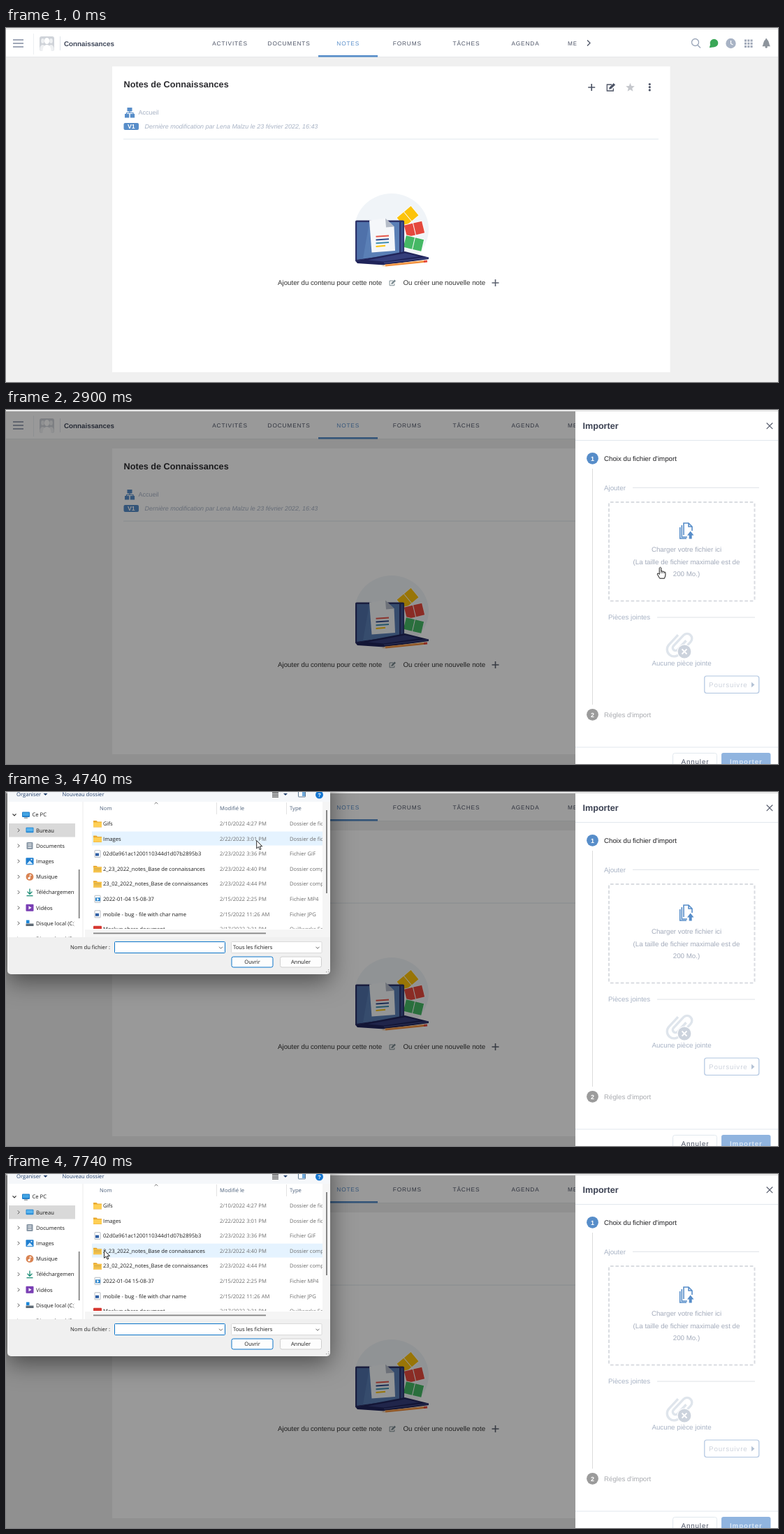
Write an HTML page with a canvas that moves like this. It is 1105 px wide and 507 px high and loops after 8 s.

```html
<!DOCTYPE html>
<html lang="fr">
<head>
<meta charset="utf-8">
<title>Importer des notes</title>
<style>
html, body { margin: 0; width: 100%; height: 100%; overflow: hidden; background: #f0f0f0; }
canvas { display: block; }
</style>
</head>
<body>
<canvas id="stage" width="1105" height="507"></canvas>
<script>
const W = 1105, H = 507, LOOP = 8000;
const c = document.getElementById('stage').getContext('2d');
const SANS = "'Liberation Sans', Arial, sans-serif";
const UI = "'Open Sans', 'Noto Sans', sans-serif";
const BLUE = '#578dc9', MUTE = '#a8b3c5', DARK = '#4d5466', LINE = '#e1e8ee', INK = '#2b2b2f';
const WIN = '#0a74c9', TRACK_BG = '#f5f5f5', THUMB = '#868686';

// ---- helpers ----
const clamp = v => Math.max(0, Math.min(1, v));
const ramp = (t, a, b) => clamp((t - a) / (b - a));

function rect(x, y, w, h, col) { c.fillStyle = col; c.fillRect(x, y, w, h); }

function box(x, y, w, h, r, fill, edge, lw = 1) {
  c.beginPath();
  c.roundRect(x, y, w, h, r);
  if (fill) { c.fillStyle = fill; c.fill(); }
  if (edge) { c.strokeStyle = edge; c.lineWidth = lw; c.stroke(); }
}

function dot(x, y, r, col, ry = r) {
  c.beginPath();
  c.ellipse(x, y, r, ry, 0, 0, 7);
  c.fillStyle = col;
  c.fill();
}

function path(d, fill, edge, lw = 1) {
  const p = new Path2D(d);
  if (fill) { c.fillStyle = fill; c.fill(p); }
  if (edge) { c.strokeStyle = edge; c.lineWidth = lw; c.stroke(p); }
}

function shadowed(blur, dy, col, fn) {
  c.save();
  c.shadowColor = col;
  c.shadowBlur = blur;
  c.shadowOffsetY = dy;
  fn();
  c.restore();
}

function clip(x, y, w, h, fn) {
  c.save();
  c.beginPath();
  c.rect(x, y, w, h);
  c.clip();
  fn();
  c.restore();
}

function at(x, y, angle, fn) {
  c.save();
  c.translate(x, y);
  c.rotate(angle);
  fn();
  c.restore();
}

// y is the middle of the capital letters
function text(s, x, y, size, col, { style = '', align = 'left', gap = 0, font = SANS } = {}) {
  c.font = `${style} ${size}px ${font}`;
  c.letterSpacing = gap + 'px';
  c.textAlign = align;
  c.fillStyle = col;
  c.fillText(s, x, y + size * 0.358);
}
const ui = (s, x, y, col = '#1b1b1b', align = 'left') => text(s, x, y, 7.65, col, { align, font: UI });

function chevron(x, y, s, dir, col, lw = 1) {
  at(x, y, dir * Math.PI / 2, () => path(`M${-s / 2} ${-s}L${s / 2} 0L${-s / 2} ${s}`, null, col, lw));
}

function plus(x, y, s, col, lw) {
  path(`M${x - s} ${y}h${2 * s}M${x} ${y - s}v${2 * s}`, null, col, lw);
}

function editIcon(x, y, k, col) {
  c.save();
  c.translate(x, y);
  c.scale(k, k);
  path('M1.5 -4H-5.2V5H3.8V1.5', null, col, 1.3);
  path('M-2.4 2.8L-1.8 0L4.2 -6L6.6 -3.6L.5 2.3Z', col);
  c.restore();
}

// ---- page ----
function header() {
  rect(0, 0, W, 41, '#fff');
  rect(0, 41, W, 1, '#e6e8ea');
  for (const y of [16, 21, 26]) rect(10, y, 15, 2, '#a0a8b8');
  rect(39, 8, 1, 30, '#eceff2');
  rect(77, 12, 1, 20, '#dfe4ea');
  c.save();
  box(48, 12, 21, 21, 3, '#cfd3d9');
  c.clip();
  for (const x of [52.5, 64.5]) {
    dot(x, 18.5, 2.3, '#eff1f3', 3.4);
    dot(x, 30, 4.2, '#eff1f3', 6);
  }
  dot(58.5, 18.5, 3.6, '#fff', 4.6);
  dot(58.5, 32, 6, '#fff', 8);
  c.restore();
  text('Connaissances', 83, 22, 9.8, '#3f4759', { style: 'bold' });

  ['ACTIVITÉS', 'DOCUMENTS', 'NOTES', 'FORUMS', 'TÂCHES', 'AGENDA'].forEach((s, i) =>
    text(s, 320.5 + i * 84.6, 22, 8.3, i === 2 ? BLUE : DARK, { align: 'center', gap: 0.85 }));
  clip(800, 10, 16.5, 24, () => text('MEMBRES', 804, 22, 8.3, DARK, { gap: 0.85 }));
  rect(447, 39, 85, 2.6, BLUE);
  chevron(834, 21.5, 4, 0, DARK, 1.3);

  c.beginPath();
  c.arc(986.5, 20.5, 5, 0, 7);
  c.strokeStyle = '#9aa5b8';
  c.lineWidth = 1.3;
  c.stroke();
  path('M990 24.5L994 28.5', null, '#9aa5b8', 1.5);
  dot(1013.5, 21.5, 5.8, '#3aa757');
  path('M1006.8 28.3L1008.6 22L1014 27.2Z', '#3aa757');
  dot(1037.5, 22, 7.2, MUTE);
  path('M1037.5 18V22.5L1040.5 24', null, '#fff', 1.2);
  for (let i = 0; i < 9; i++) rect(1057 + i % 3 * 4.3, 16.5 + Math.floor(i / 3) * 4.3, 3, 3, '#a0a8b8');
  path('M1082.5 26.2C1084.6 24 1083.6 17 1088.2 16.6C1092.8 17 1091.8 24 1094 26.2Z', '#8d949c');
  dot(1088.2, 16.3, 1.2, '#8d949c');
  dot(1088.2, 27.2, 1.6, '#8d949c');
}

function swatch(x, y, angle, col) {
  at(x, y, angle, () => {
    rect(-14, -9.5, 28, 19, '#fbfcfd');
    rect(-13, -8.5, 12.5, 17, col);
    rect(0.5, -8.5, 12.5, 17, col);
  });
}

function artwork() {
  clip(490, 230, 125, 99, () => dot(552, 288, 53, '#f0f4f8', 51));
  swatch(575, 270, -0.7, '#fcc30b');
  swatch(584.5, 288, -0.24, '#e5493d');
  swatch(583.5, 308.5, 0.23, '#45b865');
  path('M500 277Q500 275.5 502 275.5H568Q570 275.5 570 277V321L500 334Z', '#2c3269');
  path('M502.5 278H563V324L502.5 331.5Z', '#5a7fb6');
  path('M502.5 278H520L511 330.5L502.5 331.5Z', '#4f71aa');
  path('M565 278H568.5V322L565 323Z', '#3d528f');
  path('M500 333.5L571 320L605 328.5V331L541 339.5L503 337Z', '#20245a');
  path('M518 332.5L571 322.5L591 327L541 334.5Z', '#353e7b');
  path('M541 336.5L605 328.8', null, '#5560a0', 0.8);
  path('M520 275.5L543 272.5L555.5 284.5L557 319L523.5 321.5Z', '#f5f7fa');
  path('M543 272.5L555.5 284.5L544 285.5Z', '#b4bbc7');
  ['#e5574a', '#2f4a8c', '#3f8fb0', '#fcc30b'].forEach((col, i) => {
    const y = 298.8 + i * 4.7;
    path(`M529.5 ${y}L${i === 3 ? 543 : 548} ${y - 1.2}`, null, col, 2);
  });
  path('M543 340L600 334.2', null, '#f08a35', 3);
  path('M543 339.3L600 333.5', null, '#f9b36b', 1);
  path('M537.5 341.2L543 338.4V341.6Z', '#f3d3b0');
  path('M598 334.4L603 333.9', null, '#e5493d', 3);
}

function page(kebab) {
  rect(0, 0, W, H, '#f0f0f0');
  header();
  rect(152, 55, 798.5, 438, '#fff');
  text('Notes de Connaissances', 168.5, 80, 12.7, INK, { style: 'bold' });

  plus(838.2, 85, 5, DARK, 1.7);
  editIcon(865.5, 85, 1, DARK);
  c.beginPath();
  for (let i = 0; i < 10; i++) {
    const r = i % 2 ? 2.9 : 6.6, a = i * Math.PI / 5;
    c.lineTo(893.5 + r * Math.sin(a), 85.3 - r * Math.cos(a));
  }
  c.fillStyle = '#c5c7cc';
  c.fill();
  if (kebab > 0) dot(921.3, 84.5, 12.6, `rgba(60,60,60,${0.22 * kebab})`);
  for (const y of [80.5, 84.7, 88.9]) dot(921.3, y, 1.6, DARK);

  rect(173.5, 114, 7, 5.5, BLUE);
  path('M177 119V121.5M172.5 124V121.5H182V124', null, BLUE, 1.2);
  rect(170, 123, 6.3, 5.5, BLUE);
  rect(177.8, 123, 6.3, 5.5, BLUE);
  text('Accueil', 189.5, 120.5, 9, MUTE);
  box(168.5, 136, 21.5, 10, 2, BLUE);
  text('V1', 179.3, 141, 8.8, '#fff', { style: 'bold', align: 'center' });
  text('Dernière modification par Lena Malzu le 23 février 2022, 16:43', 198.5, 140.5, 8.96, MUTE, { style: 'italic' });
  rect(168, 158.6, 766, 1, LINE);

  artwork();
  text('Ajouter du contenu pour cette note', 389, 364.5, 9.72, '#333');
  editIcon(553, 365, 0.75, '#7a8a90');
  text('Ou créer une nouvelle note', 568.5, 364.5, 9.76, '#333');
  plus(700.5, 365, 5, '#5c6270', 1.6);
}

// ---- drop-down menu ----
const MENU = [
  ['Copier le Lien', 'M838 108.5L843 102.5M836.5 107L839 104.5M841.5 106.8L844 104.2M837 109.5L840 109'],
  ['Historique', 'M837 124A4.2 4.2 0 1 1 837.5 129M836 121.5V124.5H839M840.5 123.5V126.5L842.5 127.5'],
  ['Imprimer en PDF', ''],
  ['Exporter', 'M842 165.5V164H836V172H842V170.5M839 168H845.5M843.5 166L845.5 168L843.5 170'],
  ['Importer', 'M838 186.5V185H845V193H838V191.5M835.5 189H842M840 187L842 189L840 191']
];

function menu(alpha) {
  if (alpha <= 0) return;
  c.save();
  c.globalAlpha = alpha;
  shadowed(9, 3, 'rgba(0,0,0,.35)', () => box(828.5, 90, 104.5, 115, 2, '#fff'));
  MENU.forEach(([label, icon], i) => {
    const y = 105.5 + i * 20.8;
    if (icon) path(icon, null, '#8fadd3', 1.2);
    else box(836, y - 4.7, 9, 9.4, 1, '#7fa3d0');
    text(label, 852, y, 9.75, '#8e9096');
  });
  c.restore();
}

// ---- side drawer ----
function step(n, y, col, label, ink) {
  dot(839.5, y, 8.4, col);
  text(n, 839.5, y, 9, '#fff', { style: 'bold', align: 'center' });
  text(label, 856, y, 9.73, ink);
}

function drawer(dx) {
  if (dx >= 290) return;
  c.save();
  c.translate(dx, 0);
  rect(815, 2, 290, 505, '#fff');
  text('Importer', 825.5, 22.5, 12.6, '#3b4152', { style: 'bold' });
  path('M1088.7 18.5L1097.3 27.1M1097.3 18.5L1088.7 27.1', null, '#5a6070', 1.2);
  rect(815, 43, 290, 1, LINE);
  rect(839, 84, 1, 338, '#dcdcdc');
  step('1', 69.3, BLUE, "Choix du fichier d'import", '#1f1f22');
  step('2', 436.3, '#9b9b9b', "Régles d'import", '#a9abb0');

  text('Ajouter', 856, 111.5, 9.75, MUTE);
  rect(897, 110.7, 181, 1, '#dde1e6');
  c.setLineDash([4.6, 2.8]);
  box(863, 132, 208.5, 141.5, 2, null, '#d9dce1', 2);
  c.setLineDash([]);
  path('M970 179V162H977L982 167V173M977 162V167H982M967.3 165V182H975M964.7 168V184H974', null, BLUE, 1.6);
  path('M979.7 173.5L984.5 179.5H981.7V184.5H977.7V179.5H975Z', BLUE);
  ['Charger votre fichier ici', '(La taille de fichier maximale est de', '200 Mo.)'].forEach((s, i) =>
    text(s, 974, 200 + i * 17.2, 9.75, '#a3abbb', { align: 'center' }));

  text('Pièces jointes', 862, 297, 9.75, MUTE);
  rect(932, 296.5, 140, 1, '#dde1e6');
  at(964.5, 335.5, -0.82, () =>
    path('M10 3H-8A4 4 0 0 1 -8 -5H13A7 7 0 0 1 13 9H-11A10 10 0 0 1 -11 -11H8', null, '#dfe5ec', 3.4));
  dot(971, 346, 10.5, '#fff');
  dot(971, 346, 9.4, '#ccd3dd');
  path('M967.5 342.5L974.5 349.5M974.5 342.5L967.5 349.5', null, '#fff', 1.8);
  text('Aucune pièce jointe', 967, 362.3, 9.75, MUTE, { align: 'center' });
  box(999.8, 381, 78, 24.5, 3, '#fff', '#b0c5e0', 1.2);
  text('Poursuivre', 1006, 393.5, 9.75, '#ccd2dc', { gap: 0.9 });
  path('M1067 389.8L1071.5 393.5L1067 397.2Z', '#b4c2d5');

  rect(815, 482.5, 290, 1, LINE);
  box(954.5, 491.5, 63, 30, 3, '#fff', LINE);
  text('Annuler', 966.5, 503.7, 9.75, DARK, { gap: 0.9 });
  box(1024, 491, 70.5, 30, 3, '#90b4df');
  text('Importer', 1036, 503.7, 9.75, '#d9e6f5', { style: 'bold', gap: 0.9 });
  c.restore();
}

// ---- file dialog ----
const PLACES = ['Ce PC', 'Bureau', 'Documents', 'Images', 'Musique', 'Téléchargements', 'Vidéos', 'Disque local (C:)', 'Disque local (D:)'];
const FILES = [
  ['dir', 'Gifs', '2/10/2022 4:27 PM', 'Dossier de fichiers'],
  ['dir', 'Images', '2/22/2022 3:01 PM', 'Dossier de fichiers'],
  ['pic', '02d0a961ac1200110344d1d07b2895b3', '2/23/2022 3:36 PM', 'Fichier GIF'],
  ['zip', '2_23_2022_notes_Base de connaissances', '2/23/2022 4:40 PM', 'Dossier compressé'],
  ['zip', '23_02_2022_notes_Base de connaissances', '2/23/2022 4:44 PM', 'Dossier compressé'],
  ['mov', '2022-01-04 15-08-37', '2/15/2022 2:25 PM', 'Fichier MP4'],
  ['pic', 'mobile - bug - file with char name', '2/15/2022 11:26 AM', 'Fichier JPG'],
  ['red', 'Mockup share document', '2/17/2022 2:21 PM', 'Quillworks Edition']
];
const ROW = 21.55, SIDE = 22.2;

function fileIcon(kind, x, y) {
  if (kind === 'red') return box(x, y - 4.5, 12, 9, 1, '#d63a33');
  if (kind === 'dir' || kind === 'zip') {
    path(`M${x} ${y - 4.5}h4.5l1.5 1.5h6v8h-12Z`, '#e9a92f');
    rect(x, y - 2, 12, 6.5, '#ffcf55');
    if (kind === 'zip') {
      rect(x + 1, y - 0.5, 10, 1, '#b98f3a');
      rect(x + 1, y + 2, 10, 1, '#d9a93f');
    }
    return;
  }
  box(x + 2, y - 5, 8, 10, 0.5, '#fff', '#a5abb3', 0.8);
  const movie = kind === 'mov';
  rect(x + 3, y - (movie ? 2 : 1), movie ? 7 : 5, movie ? 5 : 4, movie ? '#2d86cc' : '#2f5fa5');
  if (movie) path(`M${x + 5} ${y - 1.5}l3.4 2l-3.4 2Z`, '#fff');
}

function placeIcon(i, x, y) {
  if (i < 2) {
    box(x, y - 4, 11, 7.5, 1, i ? '#2a8ad4' : '#1f7cc7');
    rect(x + 1, y - 3, 9, 4.5, i ? '#58b4ee' : '#43a5e4');
    if (!i) rect(x + 3, y + 4, 5, 1, '#5b6770');
  } else if (i === 2) {
    box(x + 1, y - 5, 9, 10, 1, '#8796a5');
    for (const d of [-2.5, 0, 2.5]) rect(x + 3, y + d - 0.5, 5, 1, '#fff');
  } else if (i === 3) {
    box(x, y - 5, 11, 10, 1, '#1f7fd0');
    path(`M${x + 1} ${y + 4}l4.5 -5l4.5 5Z`, '#d9efff');
    dot(x + 8, y - 2.5, 1, '#fff');
  } else if (i === 4) {
    dot(x + 5.5, y, 5.4, '#d98352');
    dot(x + 4.5, y + 2, 1.6, '#fff');
    path(`M${x + 5.8} ${y + 2}v-5l2.4 1`, null, '#fff', 1);
  } else if (i === 5) {
    path(`M${x + 5.5} ${y - 5}v7.5M${x + 2} ${y - 1}l3.5 3.6l3.5 -3.6M${x + 1} ${y + 5}h9`, null, '#178a72', 1.3);
  } else if (i === 6) {
    box(x, y - 5, 11, 10, 1, '#7a3fb4');
    path(`M${x + 4} ${y - 2.5}l4 2.5l-4 2.5Z`, '#fff');
  } else {
    rect(x, y + 0.5, 11, 3.5, '#5f6b75');
    if (i === 7) rect(x + 0.5, y - 4.5, 4.5, 4.5, '#1b86d8');
  }
}

function sidebar(hover) {
  clip(2, 14, 107, 194, () => {
    rect(4, 45, 95, 19.5, '#d9d9d9');
    if (hover >= 0 && hover !== 1) rect(4, 22 + hover * SIDE, 95, 20.5, '#e5f3ff');
    PLACES.forEach((name, i) => {
      const y = 32.6 + i * SIDE, x = i ? 28.5 : 23;
      if (i) chevron(18, y, 2.5, 0, '#555');
      else chevron(12, y, 2.5, 1, '#333', 1.2);
      placeIcon(i, x, y);
      clip(0, 0, 98, 220, () => ui(name, i ? 43 : 37.5, y));
    });
    rect(103.8, 111, 1.8, 70, THUMB);
  });
  if (hover === 7) {
    shadowed(3, 1.5, 'rgba(0,0,0,.5)', () => box(40, 180.5, 65.5, 16.5, 1, '#f9f9f9'));
    ui(PLACES[7], 43, 188);
  }
}

function fileList(hover) {
  ui('Nom', 134, 23.5, '#4c607a');
  ui('Modifié le', 306, 23.5, '#4c607a');
  ui('Type', 406, 23.5, '#4c607a');
  for (const x of [301, 401]) rect(x, 15, 1, 17, '#e3e3e3');
  chevron(215, 16, 2.4, 3, '#777');
  clip(110, 33, 343, 163, () => {
    if (hover >= 0) rect(123, 35 + hover * ROW, 330, 20, '#e5f3ff');
    FILES.forEach(([kind, name, date, type], i) => {
      const y = 45.5 + i * ROW;
      fileIcon(kind, 125, y);
      ui(name, 139, y);
      ui(date, 306, y, '#6d6d6d');
      ui(type, 406, y, '#6d6d6d');
    });
  });
  rect(453, 14, 11, 194, TRACK_BG);
  rect(113, 197, 340, 11, TRACK_BG);
  rect(458, 26, 2, 119, THUMB);
  rect(125, 201.5, 247, 1.8, THUMB);
}

function dialog(t, cur) {
  const p = ramp(t, 3850, 4000);
  if (p <= 0) return;
  const inside = t > 4200;
  const side = inside && cur.x > 4 && cur.x < 99 && cur.y < 208 ? Math.floor((cur.y - 21.5) / SIDE) : -1;
  const row = inside && cur.x > 123 && cur.x < 453 && cur.y > 35 && cur.y < 196 ? Math.floor((cur.y - 35) / ROW) : -1;

  c.save();
  c.globalAlpha = p;
  shadowed(34, 10, 'rgba(0,0,0,.5)', () => box(2, -30, 462, 291, 5, '#f0f0f0'));
  rect(2, 0, 462, 14, '#f5f7fa');
  rect(2, 14, 462, 194, '#fff');
  ui('Organiser', 15, 3.5, '#26436e');
  path('M53.5 2L59.5 2L56.5 5Z', '#26436e');
  ui('Nouveau dossier', 80.5, 3.5, '#26436e');
  for (let i = 0; i < 4; i++) rect(381, i * 2.2, 9, 1.1, '#444');
  path('M397 2L403 2L400 5Z', '#26436e');
  box(418.5, -1, 10, 8, 0.5, '#fff', '#5c7690');
  rect(424, 0, 4, 6, '#6fa9da');
  dot(448.5, 4, 5.5, '#1677d2');
  text('?', 448.5, 4, 7.5, '#fff', { style: 'bold', align: 'center' });
  rect(109.5, 14, 1, 194, '#ececec');

  fileList(row);
  sidebar(side);

  ui('Nom du fichier :', 92, 222.6);
  box(155.5, 214.5, 158, 16, 1, '#fff', WIN);
  chevron(307.5, 223, 2.5, 1, '#666');
  if (t < 4000 || Math.floor((t - 4000) / 530) % 2 === 0) rect(158, 217.5, 1, 10.5, '#111');
  box(322.5, 214.5, 129.5, 16, 1, '#fff', '#dadada');
  ui('Tous les fichiers', 325, 222.6);
  chevron(446, 223, 2.5, 1, '#666');
  box(323, 236, 59, 15, 2.5, '#fdfdfd', WIN);
  ui('Ouvrir', 352.5, 243.5, '#1b1b1b', 'center');
  box(392.5, 236, 59, 15, 2.5, '#fdfdfd', '#cfcfcf');
  ui('Annuler', 422, 243.5, '#1b1b1b', 'center');
  for (const [x, y] of [[461, 254], [461, 257], [458, 257]]) rect(x, y, 1.3, 1.3, '#a5a5a5');
  c.restore();
}

// ---- pointer: time, x, y, hand ----
const TRACK = [
  [150, 1040, 474, 0], [910, 913, 103, 0], [1000, 920, 86, 1], [1260, 921, 87, 1],
  [1440, 926.5, 108, 1], [1570, 945, 150, 1], [1720, 886, 186, 1], [2200, 882, 185, 0],
  [2620, 882, 185, 1], [2900, 936.5, 225, 1], [3230, 936.5, 225, 1], [3540, 940.5, 234.5, 0],
  [4080, 940.5, 234.5, 0], [4610, 440, 90, 0], [4900, 250, 42, 0], [5280, 92, 160, 1],
  [5420, 86.5, 185, 1], [5490, 86.5, 185, 0], [5900, 112, 150, 0], [6250, 150, 62, 0],
  [6420, 150, 50, 0], [6660, 147, 50, 0], [6920, 141, 106, 0], [7060, 141, 106, 0],
  [7340, 150, 126, 0], [7740, 140.5, 109, 0], [LOOP, 140.5, 109, 0]
];

function pointer(t) {
  const i = Math.max(0, TRACK.findIndex(k => k[0] > t) - 1);
  const [t0, x0, y0, hand] = TRACK[i], [t1, x1, y1] = TRACK[i + 1];
  const p = ramp(t, t0, t1), e = p * p * (3 - 2 * p);
  return { x: x0 + (x1 - x0) * e, y: y0 + (y1 - y0) * e, hand };
}

function drawPointer(t, { x, y, hand }) {
  if (t < 150) return;
  c.save();
  c.translate(x, y);
  c.lineJoin = 'round';
  if (hand) {
    path('M-1.3 1.2Q0 -.8 1.3 1.2V6Q2.6 5 3.6 6.4Q5 5.6 5.8 7Q7.4 6.6 7.4 8.4V12L6 16.2H-.8L-4.2 10.4Q-4.4 8.4 -2.7 9L-1.3 10.4Z', '#fff', '#111', 1);
    path('M1.3 6V9M3.6 6.6V9M5.8 7.2V9', null, '#111', 0.7);
  } else {
    path('M0 0V11.4L2.7 9L4.5 13.2L6.3 12.4L4.5 8.4H8Z', '#fff', '#111', 0.9);
  }
  c.restore();
  if (t >= 3560 && t < 3710) {
    c.beginPath();
    c.arc(950, 234, 4.6, 0, 7);
    c.strokeStyle = '#2d8fd8';
    c.lineWidth = 2;
    c.stroke();
  }
}

// ---- frame ----
function draw(t) {
  const cur = pointer(t);
  const shown = 1 - ramp(t, 2200, 2350);
  c.textRendering = 'geometricPrecision';
  c.textBaseline = 'alphabetic';
  page(ramp(t, 970, 1100) * shown);
  menu(ramp(t, 1220, 1360) * shown);
  rect(0, 0, W, H, `rgba(0,0,0,${0.4 * ramp(t, 2220, 2520)})`);
  drawer(290 * (1 - ramp(t, 2293, 2493)) ** 3);
  rect(0, 0, W, 1, '#f4f4f4');
  rect(0, 1, W, 1, '#dedede');
  dialog(t, cur);
  drawPointer(t, cur);
}

const start = performance.now();
function tick() {
  draw((performance.now() - start) % LOOP);
  requestAnimationFrame(tick);
}
tick();
</script>
</body>
</html>
```
